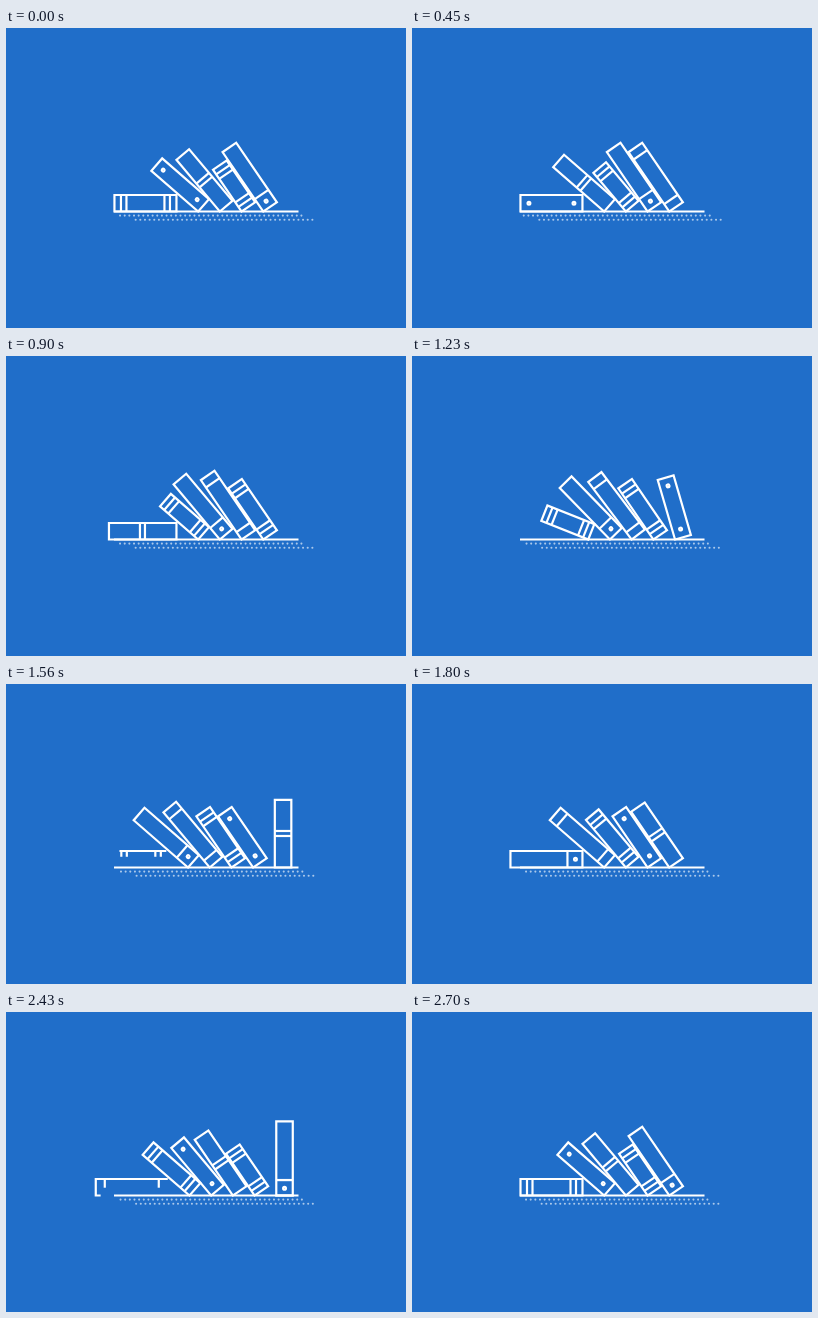
Write an HTML page that moves like this. It is 400 px wide and 300 px high and loops after 2730 ms.

```html
<!DOCTYPE html>
<html lang="en">
<head>
<meta charset="utf-8">
<title>Bookshelf loader</title>
<style>
  html, body { margin: 0; width: 100%; height: 100%; overflow: hidden; background: #206ec9; }
  svg { display: block; width: 100vw; height: 100vh; }
  .ink { fill: none; stroke: #fff; stroke-width: 2.2; }
  .dots { stroke: #fff; stroke-opacity: .62; stroke-width: 2.1; stroke-linecap: round; stroke-dasharray: 0 4.65; }
</style>
</head>
<body>
<svg viewBox="0 0 400 300">
  <line class="dots" x1="111" x2="299.7" y1="187.6" y2="187.6"/>
  <line class="dots" x1="126.6" x2="310" y1="191.7" y2="191.7"/>
  <line class="ink" x1="108" x2="292.5" y1="183.5" y2="183.5"/>
  <g id="books" class="ink"></g>
</svg>
<script>
const LOOP = 2730, CYCLE = 2700, SLOT = CYCLE / 6;
const WIDTH = 16.5, FLOOR = 183.5, START_X = 279, STEP_X = 21.7;
const DOT_GAP = 4.65, DOT_PERIOD = 300;

// Stripes and dots are measured up from the foot of each book.
const specs = [
  { h: 72, stripes: [9, 63] },
  { h: 62, stripes: [6.5, 12, 50, 55.5] },
  { h: 62, dots: [8.5, 53.5] },
  { h: 67.5, stripes: [31.5, 36.5] },
  { h: 50.5, stripes: [5.5, 11, 39.5, 45] },
  { h: 72, stripes: [15], dots: [7] }
];

// Keys are [time in slots, value].
const TILT = [[.5, 0], [1, 34.4], [2.5, 34.4], [3, 40], [3.5, 40], [4, 49], [4.5, 49], [5, 90]];
const STRETCH = [[.2, 1], [.33, 1.06], [.47, 1]];
const DRAWN = [[.03, 0], [.3, 1], [5.225, 1], [5.6, 0]];

function tween(keys, u) {
  if (u <= keys[0][0]) return keys[0][1];
  for (let i = 1; i < keys.length; i++) {
    const [a, from] = keys[i - 1], [b, to] = keys[i];
    if (u < b) return from + (to - from) * (u - a) / (b - a);
  }
  return keys[keys.length - 1][1];
}

function make(name, attrs, parent) {
  const el = document.createElementNS(parent.namespaceURI, name);
  for (const key in attrs) el.setAttribute(key, attrs[key]);
  return parent.appendChild(el);
}

const shelf = document.getElementById('books');
const rows = document.querySelectorAll('.dots');

const books = specs.map(({ h, stripes = [], dots = [] }) => {
  const group = make('g', {}, shelf);
  const path = d => make('path', { d, pathLength: 1 }, group);
  path(`M${WIDTH} 0V${-h}H0V0Z`);
  stripes.forEach(y => path(`M${WIDTH} ${-y}H0`));
  dots.forEach(y => path(`M${WIDTH / 2 + 1.4} ${-y}a1.4 1.4 0 1 0 -2.8 0a1.4 1.4 0 1 0 2.8 0Z`));
  return group;
});

function draw() {
  const t = Math.min(performance.now() % LOOP, CYCLE);

  books.forEach((book, i) => {
    const u = (t / SLOT - i + 6) % 6;
    const drawn = tween(DRAWN, u);
    const x = START_X - STEP_X * u;
    book.setAttribute('visibility', drawn > 0 ? 'visible' : 'hidden');
    book.setAttribute('stroke-dasharray', drawn < 1 ? `${drawn} 2` : 'none');
    book.setAttribute('transform',
      `translate(${x} ${FLOOR}) rotate(${-tween(TILT, u)}) scale(1 ${tween(STRETCH, u)})`);
  });

  const shift = 3.05 + DOT_GAP * (t / DOT_PERIOD % 1);
  rows.forEach(row => row.setAttribute('stroke-dashoffset', -shift));
  requestAnimationFrame(draw);
}
draw();
</script>
</body>
</html>
```
